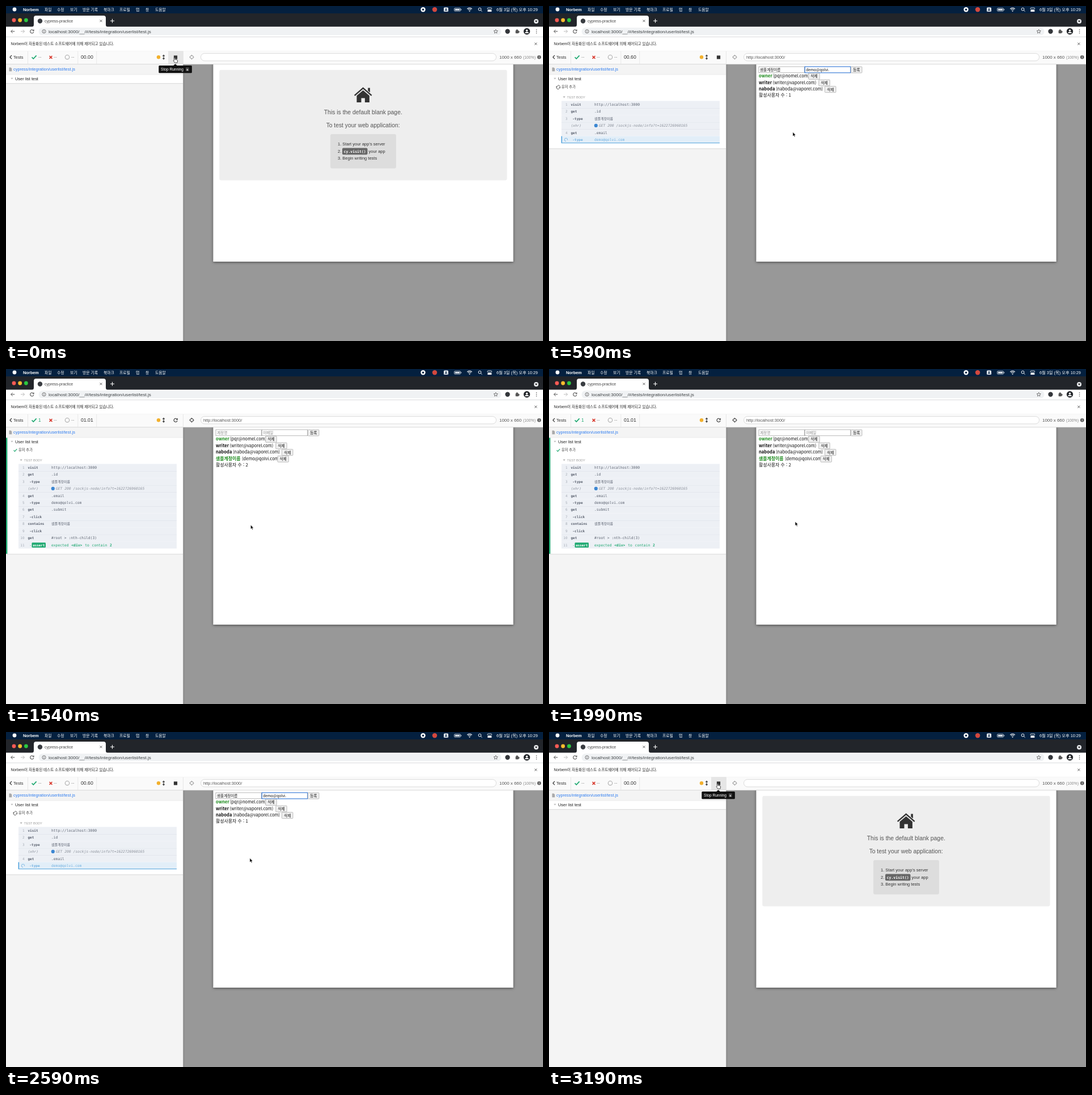
These frames come from a looping animation (947 px wide and 591 px high, 3.24 s). An HTML page:

```html
<!DOCTYPE html>
<html lang="ko">
<head>
<meta charset="utf-8">
<title>cypress-practice</title>
<style>
html, body { margin: 0; width: 100%; height: 100%; overflow: hidden; background: #999; }
svg { display: block; width: 947px; height: 591px; }
text { font-family: "Liberation Sans", "Noto Sans CJK KR", "Noto Sans CJK", sans-serif; white-space: pre; }
.app { font-family: "Noto Sans CJK KR", "Noto Sans CJK", sans-serif; }
.mono { font-family: "DejaVu Sans Mono", "Noto Sans CJK KR", "Noto Sans CJK", monospace; }
.b { font-weight: bold; }
.m { font-weight: 500; }
.i { font-style: italic; }
.mid { text-anchor: middle; }
.end { text-anchor: end; }
</style>
</head>
<body>
<svg viewBox="0 0 947 591">
  <defs>
    <filter id="shade" x="-5%" y="-5%" width="110%" height="110%">
      <feDropShadow dx="0" dy="1" stdDeviation="2.5" flood-opacity=".55"/>
    </filter>
    <linearGradient id="edge"><stop stop-color="#000" stop-opacity=".13"/><stop offset="1" stop-color="#000" stop-opacity="0"/></linearGradient>
    <g id="reload" fill="none" stroke-width="1.1">
      <path d="M2.7 -1.6A3.1 3.1 0 1 0 3.1 .8"/><path d="M3.3 -3.4V-1H.9"/>
    </g>
    <g id="sync" fill="none" stroke="#555" stroke-width=".9">
      <path d="M-2.9 -.4A2.6 2.6 0 0 1 2.5 -1M2.9 .4A2.6 2.6 0 0 1 -2.5 1"/>
      <path d="M1 -.8H3V-2.6M-1 .8H-3V2.6"/>
    </g>
  </defs>
  <g id="frame"></g>
  <g id="live"></g>
</svg>
<script>
const LOOP = 3240, HOLD = 1540, BACK = 1840, STEP = 50, FIRST = 40;
const GREEN = '#1fa971', BLUE = '#4a9fdb', ROW_TOP = 167.5, ROW_H = 12.43;
const NAME = '샘플계정이름', MAIL = 'demo@qolvi.com';

const text = (x, y, str, size, fill = '#333', cls = '') =>
  `<text x="${x}" y="${y}" font-size="${size}" fill="${fill}" class="${cls}">${str}</text>`;
const rect = (x, y, w, h, fill, more = '') =>
  `<rect x="${x}" y="${y}" width="${w}" height="${h}" fill="${fill}" ${more}/>`;
const dot = (x, y, r, fill, more = '') => `<circle cx="${x}" cy="${y}" r="${r}" fill="${fill}" ${more}/>`;
const line = (d, stroke, width = 1, more = '') =>
  `<path d="${d}" fill="none" stroke="${stroke}" stroke-width="${width}" ${more}/>`;
const shape = (d, fill, more = '') => `<path d="${d}" fill="${fill}" ${more}/>`;
const cross = (x, y, r, stroke, width = 1) =>
  line(`M${x - r} ${y - r}l${2 * r} ${2 * r}M${x + r} ${y - r}l${-2 * r} ${2 * r}`, stroke, width);
const use = (id, x, y, more = '') => `<use href="#${id}" transform="translate(${x} ${y})${more}"/>`;

function menuBar() {
  const items = [[68, '파일'], [90, '수정'], [113, '보기'], [135, '방문 기록'], [172, '북마크'],
    [200, '프로필'], [229, '탭'], [246, '창'], [263, '도움말']];
  return rect(0, 0, 947, 13, '#04203f') + dot(15, 6, 3.4, '#fff')
    + text(30, 8.8, 'Norbem', 7.4, '#fff', 'b')
    + items.map(([x, s]) => text(x, 8.7, s, 6.8, '#fff', 'm')).join('')
    + dot(735.5, 6.3, 4.2, '#fff') + rect(734, 4.8, 3, 3, '#04203f')
    + dot(756, 6.3, 4.2, '#d2483e')
    + rect(772, 2.5, 8, 7.6, '#e8edf3', 'rx="1.5"') + text(776, 8.7, 'A', 6.3, '#04203f', 'mid b')
    + rect(790.5, 3.7, 11, 5.4, 'none', 'rx="1.4" stroke="#dfe5ec" stroke-width=".8"')
    + rect(791.8, 5, 8.4, 2.8, '#dfe5ec') + rect(802.2, 5.4, 1, 2, '#dfe5ec')
    + line('M813.2 5.2a6 6 0 0 1 8.6 0M814.8 7a3.6 3.6 0 0 1 5.4 0', '#fff', 1.1) + dot(817.5, 8.8, 1, '#fff')
    + dot(835.5, 5.7, 2.4, 'none', 'stroke="#fff"') + line('M837.3 7.5l2.2 2.2', '#fff')
    + rect(849, 3, 7.6, 3, 'none', 'rx="1.5" stroke="#fff" stroke-width=".8"')
    + rect(849, 7, 7.6, 3, '#fff', 'rx="1.5"')
    + text(865, 8.8, '6월 3일 (목) 오후 10:29', 7.3, '#fff', 'm');
}

function browser() {
  const lights = ['#fc5b55', '#fdbc2e', '#2bc840'].map((c, i) => dot(14 + 10.7 * i, 25, 3.4, c)).join('');
  return rect(0, 13, 947, 24, '#22252a') + lights
    + shape('M45 37q4 0 4-4V21q0-4 4-4H172q4 0 4 4v12q0 4 4 4z', '#fff')
    + dot(60, 26.5, 4.2, '#3a3d42')
    + text(68, 28.8, 'cypress-practice', 6.9, '#444') + cross(167.5, 26.3, 1.9, '#444', .9)
    + line('M184 26.3h7M187.5 22.8v7', '#fff', 1.1)
    + dot(935, 27, 4, '#e8eaed') + shape('M932.8 25.8h4.4l-2.2 3z', '#222')
    + rect(0, 36.5, 947, 18, '#fff')
    + line('M15.3 44.8H8.7M11.7 41.8l-3 3 3 3', '#555') + line('M26 44.8h6.6M29.6 41.8l3 3-3 3', '#bbb')
    + `<g stroke="#555">${use('reload', 45.7, 44.8)}</g>`
    + rect(57.5, 38.2, 816, 13.4, '#f0f2f4', 'rx="6.7"')
    + dot(67, 44.8, 3.1, 'none', 'stroke="#555" stroke-width=".8"') + line('M67 44.3v2.2M67 42.7v.9', '#555', .8)
    + text(75, 47.5, 'localhost:3000/__/#/tests/integration/userlist/test.js', 8.1, '#3c4043')
    + shape('M863.7 41.3l1 2.3 2.6.2-2 1.7.6 2.5-2.2-1.3-2.2 1.3.6-2.5-2-1.7 2.6-.2z', 'none', 'stroke="#555" stroke-width=".8"')
    + dot(884.5, 44.8, 4.2, '#33363a')
    + rect(898.6, 43, 5.5, 5.3, '#555', 'rx=".8"') + dot(901.2, 42.6, 1.4, '#555') + dot(904.3, 45.6, 1.4, '#555')
    + dot(918.5, 44.8, 5.7, '#25282c') + dot(918.5, 43.3, 1.7, '#fff') + shape('M915.2 48a3.3 2.6 0 0 1 6.6 0z', '#fff')
    + [41.8, 44.8, 47.8].map(y => dot(935.5, y, .8, '#555')).join('')
    + rect(0, 54.5, 947, 25, '#fff') + rect(0, 54, 947, .7, '#d5d7da')
    + text(8.6, 69, 'Norbem이 자동화된 테스트 소프트웨어에 의해 제어되고 있습니다.', 6.6, '#222', 'm')
    + cross(934.3, 66.7, 2, '#444', .9);
}

function runner() {
  return rect(312, 103, 635, 488, '#989898') + rect(312, 103, 4, 488, 'url(#edge)')
    + rect(365.5, 100, 529, 351, '#fff', 'filter="url(#shade)"')
    + rect(0, 103, 312.3, 488, '#f4f4f4')
    + rect(0, 79, 947, 24, '#fafafa') + rect(0, 78.7, 947, .7, '#d8d8d8') + rect(0, 102.3, 947, .8, '#d0d0d0')
    + [38, 126.5, 159.5, 312.2].map(x => rect(x, 79, .7, 24, '#dfdfdf')).join('')
    + line('M10 87l-3 3.2 3 3.2', '#333', 1.2) + text(13, 92.8, 'Tests', 7.5)
    + line('M45.6 90.4l2.7 2.7 5.3-5.7', GREEN, 1.7)
    + cross(79, 90.4, 2.4, '#d8372c', 1.7) + text(84.3, 92.8, '--', 8.3, '#999')
    + dot(108, 90.2, 3.7, 'none', 'stroke="#aaa" stroke-width="1.1"') + text(115, 92.8, '--', 8.3, '#999')
    + dot(269, 90.2, 3.2, '#f2b02c') + line('M278 87v6.4M276.3 88.4l1.7-1.9 1.7 1.9M276.3 92l1.7 1.9 1.7-1.9', '#333', 1.1)
    + rect(343.5, 83.6, 521, 13.2, '#fff', 'rx="6.6" stroke="#ccc" stroke-width=".7"')
    + text(870, 92.8, '1000 x 660', 7.9, '#555') + text(912, 92.6, '(100%)', 6.8, '#888')
    + dot(940.2, 90.2, 3.2, '#555') + line('M940.2 89.5v2.6M940.2 87.9v1', '#fff', 1)
    + shape('M5.5 108.5h3l1.8 1.8v5H5.5z', '#aaa') + text(13, 114.3, 'cypress/integration/userlist/test.js', 7.4, '#2f7df0')
    + rect(0, 120.8, 312, .7, '#ddd');
}

function blankPage() {
  const steps = (y, s) => text(585, y, s, 7.5, '#333');
  return rect(376.3, 112.8, 507.2, 194.6, '#eee', 'rx="3"')
    + line('M614.7 157.8L629.7 144.8l15 13', '#333', 2.3)
    + shape('M618.5 158.3l11.2-9.5 11.2 9.5V170h-8v-7.5h-6.4V170h-8zM638.3 144.5h3.6v8l-3.6-3z', '#333')
    + text(629.8, 190.8, 'This is the default blank page.', 10.4, '#555', 'mid')
    + text(629.6, 214, 'To test your web application:', 10.3, '#555', 'mid')
    + rect(572, 226, 116, 60.4, '#ddd', 'rx="3"')
    + steps(246, "1. Start your app's server") + steps(258.8, '2.') + steps(271.4, '3. Begin writing tests')
    + rect(593, 250.4, 44.5, 11.8, '#666', 'rx="2"') + text(595.6, 258.5, 'cy.visit()', 6.5, '#fff', 'mono b')
    + text(639.5, 258.8, 'your app', 7.5);
}

function appPage(s) {
  const added = s >= 840, active = s >= 990;
  const users = [['owner', 'pqr@nomel.com', 395, 457.3, true], ['writer', 'writer@vaporel.com', 394.5, 475.3],
    ['naboda', 'naboda@vaporel.com', 400, 486]];
  if (added) users.push([NAME, MAIL, 416, 478.5, active]);
  const button = (x, y, label, border = '#999', w = .6) =>
    rect(x + .4, y, 19.6, 11, '#efefef', `rx="1.2" stroke="${border}" stroke-width="${w}"`)
    + text(x + 10.2, y + 8, label, 6.6, '#111', 'mid app');
  const typing = (from, to, str) => str.slice(0, Math.round(str.length * Math.max(0, Math.min(1, (s - from) / (to - from)))));
  const field = (x, hint, value, focus) =>
    rect(x, 107, 80.6, 10.8, '#fff', `stroke="${focus ? '#2d73d5' : '#888'}" stroke-width="${focus ? 1.1 : .6}"`)
    + text(x + 2, 114.8, value || hint, 6.6, value ? '#111' : '#888', 'app');
  const id = added ? '' : typing(240, 390, NAME), mail = added ? '' : typing(390, 640, MAIL);
  const pressed = s >= 690 && s < 940;
  return field(370, '계정명', id, s >= 290 && s < 390) + field(451.2, '이메일', mail, s >= 390 && s < 690)
    + button(532, 107, '등록', pressed ? '#2d73d5' : '#999', pressed ? 1.3 : .6)
    + users.map(([name, addr, x, bx, on], i) => {
      const y = 126.1 + 11.6 * i;
      return text(370, y, name, name === NAME ? 7.9 : 7.6, on ? '#1c8a1c' : '#111', 'app b')
        + text(x, y, `(${addr})`, 7.55, '#111', 'app') + button(bx, y - 7.7, '삭제');
    }).join('')
    + text(370, 125.6 + 11.6 * users.length, `활성사용자 수 : ${active ? 2 : 1}`, 7.9, '#111', 'app');
}

// [number, method, message, start, end]
const COMMANDS = [
  [1, 'visit', 'http://localhost:3000', 40, 190], [2, 'get', '.id', 190, 190],
  [3, '-type', NAME, 240, 390], ['', '(xhr)', '', 240, 290],
  [4, 'get', '.email', 390, 390], [5, '-type', MAIL, 390, 640],
  [6, 'get', '.submit', 640, 640], [7, '-click', '', 690, 840],
  [8, 'contains', NAME, 890, 890], [9, '-click', '', 890, 940],
  [10, 'get', '#root &gt; :nth-child(3)', 990, 990], [11, 'assert', '', 990, 990]];

function command([num, method, message, start, end], i, s) {
  const top = ROW_TOP + ROW_H * i, y = top + 8.4, busy = s < end;
  const xhr = method === '(xhr)', child = method[0] === '-', check = method === 'assert';
  const ink = busy && !xhr ? '#72b0df' : '#5b6270';
  let out = rect(22, top, 279, ROW_H, busy ? '#e2eef8' : '#edf0f5');
  if (!child && !check && i) out += rect(22, top, 279, .6, '#dce0e8');
  if (busy) {
    out += rect(21.6, top, 1.5, ROW_H, BLUE)
      + line('M2.2 -1.6A2.7 2.7 0 1 1 -1 -2.5', '#83b9e2', .9, `transform="translate(30 ${top + 6.2}) rotate(${(s - 240) * .36})"`);
    if (!xhr) out += rect(22, top + ROW_H - 1.1, 279, 1.2, '#69afe0');
  } else out += text(32.6, y, num, 6, '#a5abb5', 'mono end');
  if (check) {
    out += text(41.5, y, '-', 6, GREEN, 'mono') + rect(45.5, top + 2.1, 24.5, 8.6, GREEN, 'rx="1.3"')
      + text(47.2, y, 'assert', 5.9, '#fff', 'mono b')
      + `<g word-spacing="1">${text(80, y, 'expected <tspan class="b">&lt;div&gt;</tspan> to contain <tspan class="b">2</tspan>', 6.33, GREEN, 'mono')}</g>`;
  } else if (xhr) {
    out += text(38.7, y, method, 6, '#858b96', 'mono i') + dot(82.8, top + 6.1, 3.1, busy ? '#999' : '#3c87d2')
      + text(88, y, `GET ${busy ? '---' : '200'} /sockjs-node/info?t=1622726960165`, 6.33, '#8b919b', 'mono i');
  } else {
    out += text(child ? 41.5 : 38.5, y, method, 6, ink, 'mono b')
      + text(80, y, message, message === NAME ? 6 : 6.33, ink, 'mono');
  }
  return out;
}

function log(s, done) {
  const rows = COMMANDS.filter(c => s >= c[3]);
  const bottom = rows.length ? ROW_TOP + ROW_H * rows.length + 9.3 : 136;
  let out = rect(0, 121.4, 312, bottom - 121.4, '#fff') + rect(0, bottom, 312, .8, '#d6d6d6')
    + rect(0, bottom + .8, 312, .8, '#ebebeb')
    + shape('M8.4 126.7h4.2l-2.1 2.7z', '#bbb') + text(16, 130.6, 'User list test', 7.45, '#222');
  if (!rows.length) return out;
  if (done) out += rect(0, 121.4, 2.4, bottom - 121.4, GREEN) + line('M13.5 143.4l2 2 3.7-4.2', GREEN, 1.2);
  else out += use('sync', 16.3, 143.3, ` rotate(${(s - 240) * .1385})`);
  return out + text(22, 145.4, '유저 추가', 6.3, '#444') + shape('M24.6 159.4h4.2l-2.1 2.7z', '#aaa')
    + text(32, 162.9, 'TEST BODY', 5.65, '#999') + rows.map((c, i) => command(c, i, s)).join('');
}

function controls(s, done) {
  const clock = Math.min(1.01, Math.floor(s * .1025) / 100).toFixed(2).padStart(5, '0');
  const aim = done ? '#333' : '#999';
  let out = text(57, 92.8, done ? '1' : '--', 8.3, done ? GREEN : '#999') + text(132, 93.2, clock, 8.7);
  if (s < FIRST) out += rect(286, 79.3, 26.3, 23, '#e6e6e6');
  out += done ? `<g stroke="#333">${use('reload', 299, 90.3)}</g>` : rect(295.9, 87.4, 6.2, 6.2, '#333');
  out += dot(327.5, 90.2, 3, 'none', `stroke="${aim}" stroke-width=".9"`)
    + line('M327.5 86v2.6M327.5 91.8v2.6M323.3 90.2h2.6M329.1 90.2h2.6', aim, .9);
  return s >= 140 ? out + text(348, 92.8, 'http://localhost:3000/', 7.4, '#555') : out;
}

function pointer(s) {
  if (s < FIRST) {
    return rect(269.3, 105, 58.6, 13.2, '#111', 'rx="1.5"') + shape('M295 105.2l3.5-3 3.5 3z', '#111')
      + text(273, 114, 'Stop Running', 6.6, '#fff') + rect(317, 108.3, 5.8, 6.8, '#444', 'rx="1"')
      + text(319.9, 113.6, 's', 5.6, '#fff', 'mid b')
      + shape('M297 91.2q1.1-.9 1.6.5v2.6l3 .7q1.2.5 1 2l-.7 3.2H297.6l-2.4-3.7q0-1.4 1.4-.6z', '#fff', 'stroke="#222" stroke-width=".8"');
  }
  const path = [[0, 298, 91], [240, 420.5, 181], [890, 438, 258], [1090, 435.5, 266], [1340, 432, 274], [1540, 431.4, 275]];
  const n = path.findIndex(p => s <= p[0]), [t0, x0, y0] = path[n - 1], [t1, x1, y1] = path[n];
  const f = (s - t0) / (t1 - t0);
  return shape('M0 0V7.4l1.7-1.5 1.2 2.7 1.3-.6-1.2-2.6h2.3z', '#000',
    `stroke="#fff" stroke-width=".6" transform="translate(${x0 + (x1 - x0) * f} ${y0 + (y1 - y0) * f})"`);
}

// The run plays forward, rests, then rewinds.
function stateAt(t) {
  if (t < FIRST) return 0;
  if (t < BACK) return Math.min(HOLD, FIRST + Math.floor((t - FIRST) / STEP) * STEP);
  return Math.max(0, 1340 - Math.floor((t - BACK) / STEP) * STEP);
}

const live = document.getElementById('live');
document.getElementById('frame').innerHTML = runner() + browser() + menuBar();
const begin = performance.now();
let shown = -1;

function draw() {
  const s = stateAt((performance.now() - begin) % LOOP);
  if (s !== shown) {
    const done = s >= 1040;
    const page = s < 140 ? blankPage() : s < 190 ? '' : appPage(s);
    live.innerHTML = controls(s, done) + log(s, done) + page + pointer(s);
    shown = s;
  }
  requestAnimationFrame(draw);
}
draw();
</script>
</body>
</html>
```
